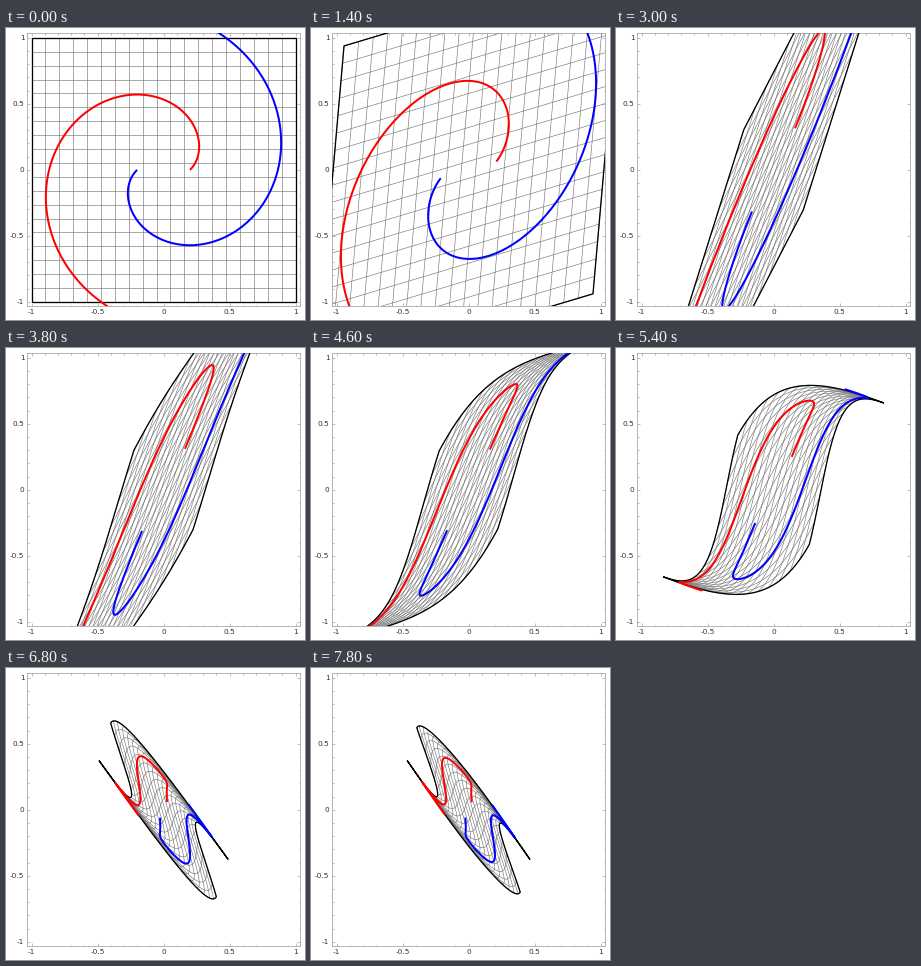
Animation of 299x292 px, one loop 8 s. Source, as a matplotlib script:

```python
import numpy as np
import matplotlib.pyplot as plt
from matplotlib.animation import FuncAnimation
from matplotlib.collections import LineCollection
from matplotlib.ticker import AutoMinorLocator

W, H, DPI = 299, 292, 72
STEP, FRAMES = 200, 40
UNIT = 132                      # pixels per data unit
LEFT, TOP, SIDE = 21, 5.4, 273

# Matrix entries (a, b, c, d) passed on the way from identity, by time in ms
LAYERS = [
    dict(times=[900, 1400, 2200, 2900],
         mats=[(1, 0, 0, 1), (1.053, 0.11, 0.315, 1.254),
               (1.03, 0.33, 1.06, 1.727), (0.815, 0.59, 1.575, 1.88)]),
    dict(times=[4900, 5600, 6200, 6900],
         mats=[(1, 0, 0, 1), (1.11, -0.18, -0.70, 1.09),
               (1.221, -0.376, -1.389, 1.136), (1.12, -0.515, -1.59, 1.03)]),
]
SQUASH = 2000                   # duration of each tanh stage


def smooth_path(t, times, values):
    """Cubic Hermite curve through the values, at rest at both ends."""
    x, y = np.array(times, float), np.array(values, float)
    t = np.clip(t, x[0], x[-1])
    slope = np.zeros_like(y)
    slope[1:-1] = (y[2:] - y[:-2]) / (x[2:] - x[:-2])[:, None]
    i = min(np.searchsorted(x, t, side="right") - 1, len(x) - 2)
    h = x[i + 1] - x[i]
    u = (t - x[i]) / h
    return ((1 + 2 * u) * (1 - u) ** 2 * y[i] + u * (1 - u) ** 2 * h * slope[i]
            + u * u * (3 - 2 * u) * y[i + 1] + u * u * (u - 1) * h * slope[i + 1])


def ease(u):
    return (1 - np.cos(np.pi * np.clip(u, 0, 1))) / 2


def warp(points, t):
    """Send points (..., 2) through the layers as they stand at time t."""
    for layer in LAYERS:
        mat = smooth_path(t, layer["times"], layer["mats"]).reshape(2, 2)
        points = points @ mat.T
        s = ease((t - layer["times"][-1]) / SQUASH)
        points = (1 - s) * points + s * np.tanh(points)
    return points


def make_shapes():
    run = np.linspace(-1, 1, 161)
    rows = [np.column_stack([run, np.full_like(run, k)])
            for k in np.linspace(-1, 1, 20)]
    grid = np.array(rows + [r[:, ::-1] for r in rows])
    one = np.ones_like(run)
    square = np.concatenate([
        np.column_stack(side) for side in
        [(run, -one), (one, run), (-run, one), (-one, -run)]])
    s = np.linspace(0, 1, 300)
    angle, radius = 1.5 * np.pi * s, 0.2 + s
    spiral = np.column_stack([radius * np.cos(angle), radius * np.sin(angle)])
    return grid, square, spiral


grid, square, spiral = make_shapes()

fig = plt.figure(figsize=((W + 0.01) / DPI, (H + 0.01) / DPI), dpi=DPI,
                 facecolor="white")
ax = fig.add_axes([LEFT / W, 1 - (TOP + SIDE) / H, SIDE / W, SIDE / H])
lim = SIDE / 2 / UNIT
ax.set(xlim=(-lim, lim), ylim=(-lim, lim))

ticks = [-1, -0.5, 0, 0.5, 1]
names = [f"{v:g}" for v in ticks]
ax.set_xticks(ticks, names)
ax.set_yticks(ticks, names)
ax.xaxis.set_minor_locator(AutoMinorLocator(5))
ax.yaxis.set_minor_locator(AutoMinorLocator(5))
ax.tick_params(which="both", direction="in", top=True, right=True,
               color="0.5", width=0.5, length=1.5)
ax.tick_params(which="major", length=3, labelsize=7.4, labelcolor="0.2", pad=2.5,
               labelfontfamily="DejaVu Sans")
for spine in ax.spines.values():
    spine.set(color="0.6", linewidth=0.7)

mesh = LineCollection([], colors="0.45", linewidths=0.6, zorder=2)
ax.add_collection(mesh, autolim=False)
style = dict(solid_capstyle="butt", solid_joinstyle="round")
border, = ax.plot([], [], color="black", lw=1.3, zorder=3, **style)
blue, = ax.plot([], [], color="#0000ff", lw=2, zorder=4, **style)
red, = ax.plot([], [], color="#ff0000", lw=2, zorder=4, **style)


def draw(i):
    t = i * STEP
    mesh.set_segments(list(warp(grid, t)))
    border.set_data(*warp(square, t).T)
    arm = warp(spiral, t)
    red.set_data(*arm.T)
    blue.set_data(*-arm.T)      # every layer is odd, so the arms mirror
    return mesh, border, blue, red


anim = FuncAnimation(fig, draw, frames=FRAMES, interval=STEP,
                     init_func=lambda: draw(0), repeat=True, repeat_delay=0)
plt.show()
```
